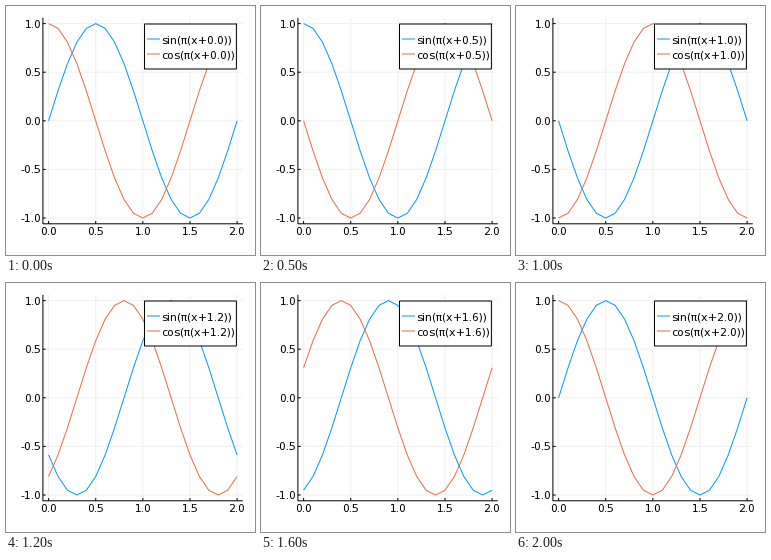
A matplotlib script for the animation above (2.1 s loop, 249 by 249 pixels).

```python
import numpy as np
import matplotlib.pyplot as plt
from matplotlib.animation import FuncAnimation
from matplotlib.patches import Rectangle

SIZE, DPI = 249, 100
FRAMES, INTERVAL = 21, 100
BLUE, ORANGE = "#009af9", "#e26f46"
LEFT, RIGHT, TOP, BOTTOM = 36.9, 236.8, 11.8, 217.8
PX = 72 / DPI  # points per pixel

plt.rcParams.update({
    "font.family": "DejaVu Sans",
    "text.hinting_factor": 1,  # whole-pixel letter spacing
    "path.simplify": False,
    "path.snap": False,
})

fig = plt.figure(figsize=(SIZE / DPI, SIZE / DPI), dpi=DPI, facecolor="white")
ax = fig.add_axes([0, 0, 1, 1])
ax.set_xlim(0, SIZE)
ax.set_ylim(SIZE, 0)
ax.axis("off")


def to_px(x, y):
    return 42.6 + 94.25 * np.asarray(x), 114.8 - 97.2 * np.asarray(y)


def line(xs, ys, color="black", z=2):
    return ax.plot(xs, ys, color=color, lw=PX, zorder=z,
                   solid_capstyle="butt", solid_joinstyle="miter")[0]


def label(x, y, s, ha):
    return ax.text(x, y, s, ha=ha, va="baseline", fontsize=10.75 * PX,
                   zorder=6)


# Grid, ticks and tick labels
for v in np.linspace(0, 2, 5):
    gx, _ = to_px(v, 0)
    line([gx, gx], [TOP, BOTTOM], "#f0f0f0", z=1)
    line([gx, gx], [BOTTOM, BOTTOM - 2.8])
    label(gx, 229, f"{v:.1f}", "center")
for v in np.linspace(-1, 1, 5):
    _, gy = to_px(0, v)
    line([LEFT, RIGHT], [gy, gy], "#f0f0f0", z=1)
    line([LEFT, LEFT + 2.8], [gy, gy])
    label(35.3, gy + 4, f"{v:.1f}", "right")
line([LEFT, LEFT, RIGHT], [TOP, BOTTOM, BOTTOM])

# Curves and legend
x = np.linspace(0, 2, 21)
ax.add_patch(Rectangle((138.5, 18), 91.9, 45, fc="white", ec="black",
                       lw=PX, zorder=5))
series = []
for name, fn, color, ly in (("sin", np.sin, BLUE, 33),
                            ("cos", np.cos, ORANGE, 48)):
    curve = line([], [], color, z=3)
    line([141, 154], [ly, ly], color, z=6)
    series.append((name, fn, curve, label(155.5, ly + 4, "", "left")))


def update(i):
    shift = i / 10
    for name, fn, curve, text in series:
        curve.set_data(*to_px(x, fn(np.pi * (x + shift))))
        text.set_text(f"{name}(π(x+{shift:.1f}))")
    return [item for s in series for item in s[2:]]


anim = FuncAnimation(fig, update, frames=FRAMES, interval=INTERVAL,
                     init_func=lambda: update(0), repeat=True, repeat_delay=0)
plt.show()
```
